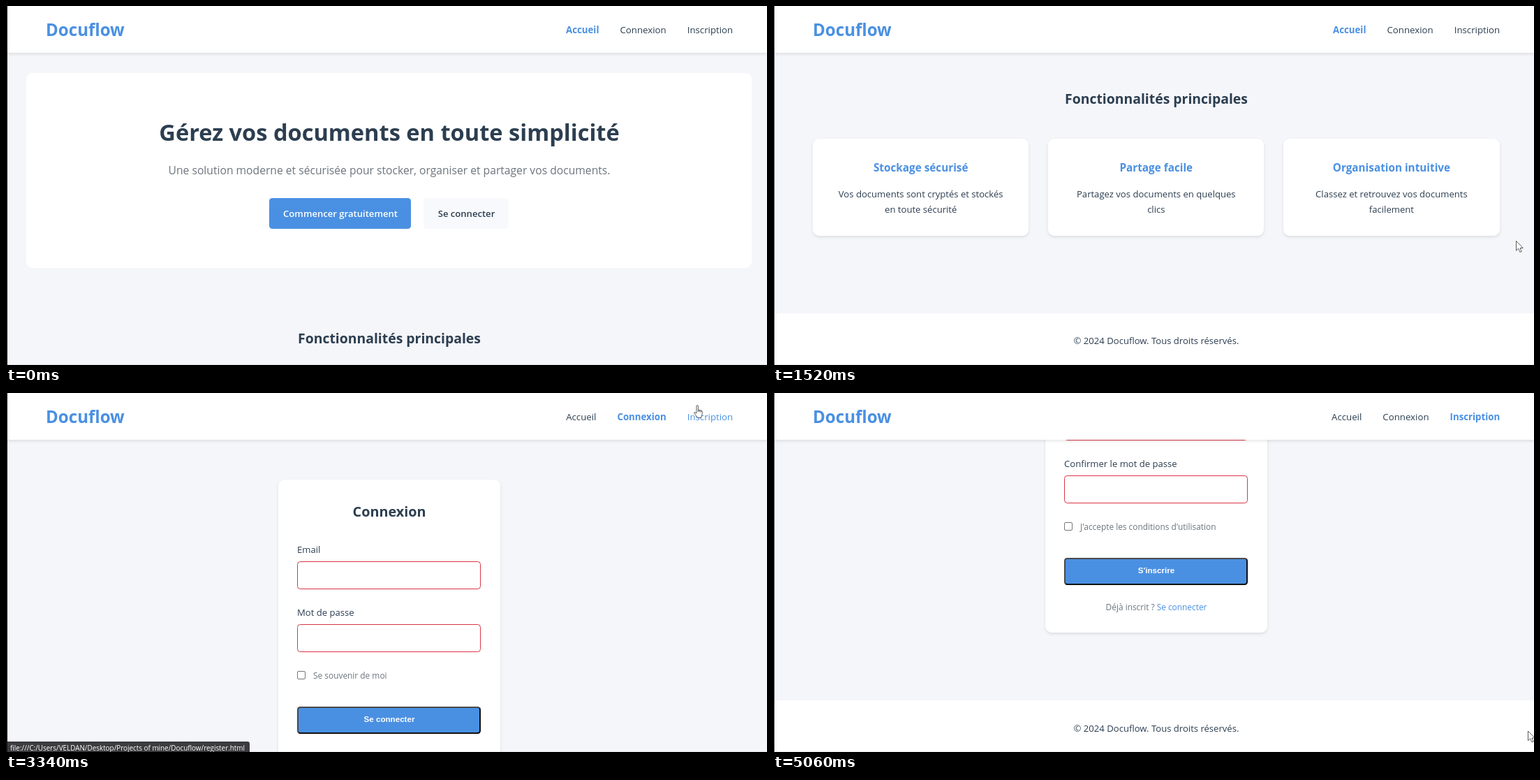
An HTML page that plays this animation: 1090x514 px, repeating every 5120 ms.

```html
<!DOCTYPE html>
<html lang="fr">
<head>
<meta charset="utf-8">
<title>Docuflow</title>
<style>
  html, body { margin: 0; width: 100%; height: 100%; overflow: hidden; }
  body { position: relative; background: #f5f6fa; color: #2c3e50; font: 13.1px "Open Sans", "Noto Sans", sans-serif; }
  div, span, header, footer, svg { position: absolute; box-sizing: border-box; }
  #stage { left: 0; top: 0; width: 1090px; height: 514px; overflow: hidden; background: #f5f6fa; }

  /* Text is placed by its optical middle. */
  span { line-height: 0; white-space: nowrap; }
  .mid { transform: translateX(-50%); }
  .bold { font-weight: 700; }
  .semi { font-weight: 600; }
  .blue, nav .on, nav .hover { color: #4a90e2; }
  .small { font-size: 11.9px; color: #6c757d; }

  header { left: 0; top: 0; width: 1090px; height: 67px; background: #fff; box-shadow: 0 2px 4px rgba(0,0,0,.1); }
  .logo { left: 57px; top: 34px; font-size: 24.1px; }
  nav { position: absolute; right: 48.8px; top: 33.5px; display: flex; gap: 30px; font-size: 13.25px; }
  nav span { position: static; }
  nav .on { font-weight: 700; }

  .page { left: 0; top: 0; width: 1090px; visibility: hidden; }
  .page.show { visibility: visible; }
  .card { background: #fff; border-radius: 9px; box-shadow: 0 2px 4px rgba(0,0,0,.1); }
  .hero { left: 29px; top: 96px; width: 1039px; height: 278.5px; background: #fff; border-radius: 9px; }
  .btn { top: 275px; height: 44px; border-radius: 4.4px; }
  footer { left: 0; width: 1090px; height: 75px; background: #fff; }
  .field { left: 417px; width: 263px; height: 40px; border: 1px solid #dc3545; border-radius: 4.4px; background: #fff; }
  .check { left: 417px; width: 12px; height: 12px; border: 1px solid #767676; border-radius: 2px; background: #fff; }
  .submit { left: 417px; width: 263px; height: 39px; background: #4a90e2; border: 2px solid; border-color: #4a4a4a #111 #111 #4a4a4a; border-radius: 4.4px; }
  .submit + span { color: #fff; font: 700 11.6px/0 "Liberation Sans", Arial, sans-serif; }

  #status { left: 1px; top: 499px; height: 16px; padding: 0 7px 0 5px; background: #3c3c3f; color: #fff; border-radius: 0 3px 0 0; font-size: 9.9px; line-height: 19px; white-space: nowrap; }
  svg { left: 0; top: 0; width: 15px; height: 21px; overflow: visible; fill: #fff; stroke: #333; stroke-width: .8; stroke-linejoin: round; }
  .edge { left: 0; top: 0; width: 1.5px; height: 514px; background: #111; }
  .base { left: 0; top: 513px; width: 1090px; height: 1px; background: rgba(0,0,0,.08); }
</style>
</head>
<body>
<div id="stage">
  <div class="page" id="home"></div>
  <div class="page" id="login"></div>
  <div class="page" id="register"></div>
  <header>
    <span class="logo bold blue">Docuflow</span>
    <nav><span>Accueil</span><span>Connexion</span><span>Inscription</span></nav>
  </header>
  <div id="status"></div>
  <svg id="cursor"><path/></svg>
  <div class="edge"></div>
  <div class="base"></div>
</div>
<script>
const LOOP = 5120;
const $ = id => document.getElementById(id);

// Markup helpers
const text = (x, y, str, cls = '', css = '') =>
  `<span class="${cls}" style="left:${x}px;top:${y}px;${css}">${str}</span>`;
const mid = (x, y, str, cls = '', css = '') => text(x, y, str, 'mid ' + cls, css);
const box = (cls, css) => `<div class="${cls}" style="${css}"></div>`;
const footer = y => `<footer style="top:${y}px"></footer>` +
  mid(549, y + 39.5, '© 2024 Docuflow. Tous droits réservés.');

function feature(i, title, ...lines) {
  const x = 57 + 337.1 * i, c = x + 154.7;
  return box('card', `left:${x}px;top:532.7px;width:309.4px;height:139px`) +
    mid(c, 574.1, title, 'bold blue', 'font-size:15.3px') +
    lines.map((line, n) => mid(c, 612.2 + 22.2 * n, line)).join('');
}

function form(title, labels, check, action, ask, link) {
  const pitch = 89.7, shift = pitch * (labels.length - 2), end = 556 + shift;
  return box('card', `left:389.5px;top:124px;width:318.5px;height:${end - 124}px`) +
    mid(549, 169.5, title, 'bold', 'font-size:19.8px') +
    labels.map((label, i) => text(417, 224.3 + pitch * i, label) +
      box('field', `top:${241.3 + pitch * i}px`)).join('') +
    box('check', `top:${398 + shift}px`) +
    text(440, 403.7 + shift, check, 'small') +
    box('submit', `top:${448.8 + shift}px`) +
    mid(549, 467.1 + shift, action) +
    mid(549, 518.4 + shift, `${ask} <b class="blue" style="font-weight:400">${link}</b>`, 'small') +
    footer(end + 97);
}

$('home').innerHTML =
  box('hero', '') +
  mid(549, 181, 'Gérez vos documents en toute simplicité', 'bold', 'font-size:32.6px') +
  mid(549, 235, 'Une solution moderne et sécurisée pour stocker, organiser et partager vos documents.', '', 'font-size:15.67px;color:#6c757d') +
  box('btn', 'left:377px;width:203px;background:#4a90e2') +
  mid(479, 297.4, 'Commencer gratuitement', 'semi', 'color:#fff') +
  box('btn', 'left:598px;width:122px;background:#f8f9fc') +
  mid(659.5, 297.4, 'Se connecter', 'semi') +
  mid(549, 475.6, 'Fonctionnalités principales', 'bold', 'font-size:19.4px') +
  feature(0, 'Stockage sécurisé', 'Vos documents sont cryptés et stockés', 'en toute sécurité') +
  feature(1, 'Partage facile', 'Partagez vos documents en quelques', 'clics') +
  feature(2, 'Organisation intuitive', 'Classez et retrouvez vos documents', 'facilement') +
  footer(782.7);
$('login').innerHTML = form('Connexion', ['Email', 'Mot de passe'],
  'Se souvenir de moi', 'Se connecter', 'Pas encore inscrit ?', "S'inscrire");
$('register').innerHTML = form('Créer un compte',
  ['Prénom', 'Nom', 'Email', 'Mot de passe', 'Confirmer le mot de passe'],
  "J'accepte les conditions d'utilisation", "S'inscrire", 'Déjà inscrit ?', 'Se connecter');

// Progress in n jumps: the first at t0, the last at t1.
function steps(t, t0, t1, n) {
  if (t < t0) return 0;
  return Math.min(n, Math.floor((t - t0) / (t1 - t0) * (n - 1) + 1e-6) + 1) / n;
}
const ease = p => (1 - Math.cos(Math.PI * p)) / 2;

// Last entry whose time has come.
const hold = (track, t) => track.findLast(key => key[0] <= t);

const ARROW = 'M.5 .5V14.2L3.6 11.2 6 16.5 8.2 15.5 6 10.5H10.3Z';
const HAND = 'M4 12V1.8a1.2 1.2 0 0 1 2.4 0V7.2l4.6 1q1.6.4 1.4 2l-.6 4.6-1.2 3.4H5Q3.6 15.5.9 12q-.6-1.4 1-1.4ZM6.4 7.2v3M8.4 7.8v2.6M10.4 8.2v2.4';

const pages = [[0, 'home'], [2600, 'login'], [3440, 'register']];
const names = ['home', 'login', 'register'];

const pointer = [
  [0, -50, -50, ARROW], [310, 1064, 336, ARROW],
  [2240, 1030, 190, ARROW], [2310, 965, 70, ARROW], [2380, 915, 4, ARROW], [2450, 894.5, 38, HAND],
  [3140, 920, 34, HAND], [3214, 956, 24, ARROW], [3289, 985, 17, HAND], [3363, 990, 26, HAND],
  [3511, 985, 50, ARROW], [3586, 955, 110, ARROW], [3660, 933, 137, ARROW]
];

const status = [
  [0, 'login', 0], [2450, 'login', 1], [2800, 'login', .9], [2860, 'login', .6], [2910, 'login', .3],
  [2970, 'login', 0], [3289, 'register', 1], [3660, 'register', .75], [3720, 'register', .35], [3770, 'register', 0]
];

const formScroll = [
  [0, 0], [4040, 28], [4120, 112], [4200, 207], [4280, 293], [4360, 370], [4445, 428], [4530, 464],
  [4590, 477], [4710, 482]
];

function homeScroll(t) {
  if (t >= 2240) return 343 * (1 - steps(t, 2240, 2450, 4));
  return 204 * ease(steps(t, 470, 990, 8)) + 139 * ease(steps(t, 1140, 1520, 6));
}

function scrollPage(name, y) {
  $(name).style.transform = `translateY(${-Math.round(y)}px)`;
}

function draw(t) {
  const page = hold(pages, t)[1];
  const [, x, y, shape] = hold(pointer, t);
  const [, file, alpha] = hold(status, t);

  names.forEach(name => $(name).classList.toggle('show', name === page));
  scrollPage('home', homeScroll(t));
  scrollPage('register', hold(formScroll, t)[1]);

  document.querySelectorAll('nav span').forEach((item, i) => {
    const over = shape === HAND && i === (t < 3214 ? 1 : 2);
    item.className = names[i] === page ? 'on' : over ? 'hover' : '';
  });

  $('status').textContent = `file:///C:/Users/VELDAN/Desktop/Projects of mine/Docuflow/${file}.html`;
  $('status').style.opacity = alpha;

  const exit = steps(t, 4900, 5060, 4);
  $('cursor').style.transform = `translate(${x + 148 * exit}px, ${y + 346.5 * exit}px)`;
  $('cursor').firstElementChild.setAttribute('d', shape);
}

function tick() {
  draw(performance.now() % LOOP);
  requestAnimationFrame(tick);
}
tick();
</script>
</body>
</html>
```
